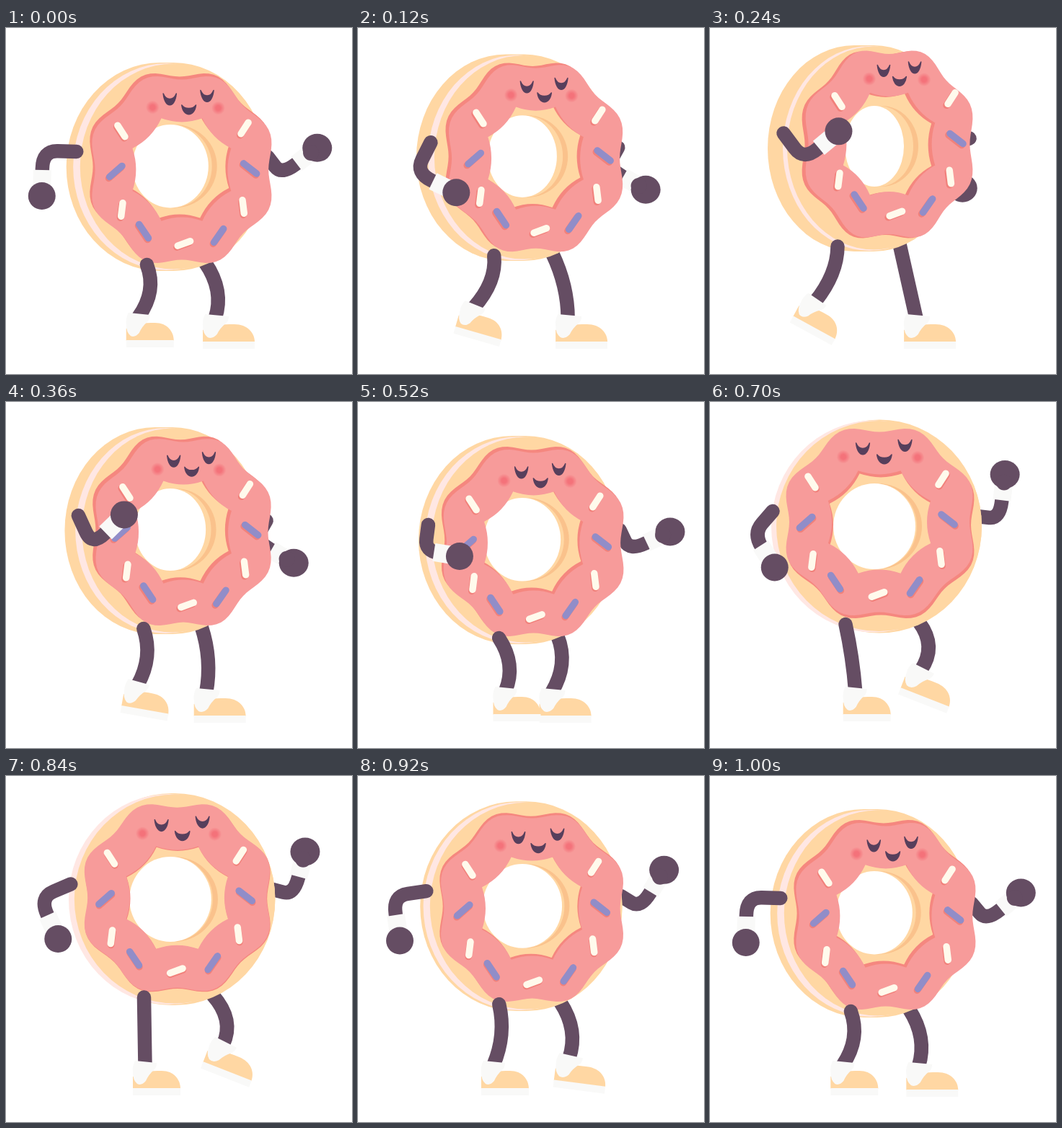
Recreate the animation shown at these times as an HTML page. Size 480 by 480 pixels, loop 1.02 s.

```html
<!DOCTYPE html>
<html lang="en">
<head>
<meta charset="utf-8">
<title>Walking donut</title>
<style>
  html, body { margin: 0; width: 100%; height: 100%; overflow: hidden; background: #fff; }
  svg { display: block; width: 100%; height: 100%; }
  .dough { fill: #ffd7a3; }
  .white { fill: #f9f9f8; }
  .limb { fill: none; stroke: #654d63; stroke-width: 19.5; stroke-linecap: round; stroke-linejoin: round; }
  .cuff { stroke: #f9f9f8; stroke-width: 25; }
  .hand { fill: #654d63; }
  .sprinkle { fill: none; stroke-width: 9.5; stroke-linecap: round; }
</style>
</head>
<body>
<svg viewBox="0 0 480 480">
  <defs>
    <radialGradient id="blush">
      <stop offset="0.35" stop-color="#f4727a"/>
      <stop offset="1" stop-color="#f4727a" stop-opacity="0"/>
    </radialGradient>
    <path id="icing" fill-rule="evenodd"/>
    <g id="shoe">
      <path class="dough" d="M0-9V-26Q14-34 34-34H40C57-34 66-22 66-9Z"/>
      <path class="white" d="M0-10H66V0H0Z"/>
      <path class="white" d="M3-48L33-45Q33-39 29-35Q22-29 18-20Q12-13 6-16Q0-21 0-32Q-1-40 3-48Z"/>
    </g>
  </defs>

  <path id="armR" class="limb"/>
  <path id="cuffR" class="cuff"/>
  <g id="handR" class="hand"><ellipse rx="20.5" ry="19.5"/><circle id="thumb" r="11"/></g>
  <path id="legR" class="limb"/>
  <use id="shoeR" href="#shoe"/>

  <rect id="back" class="dough"/>
  <ellipse id="cream" fill="#ffe7e3"/>
  <ellipse id="front" class="dough"/>
  <ellipse id="wall" fill="#fac28c"/>
  <ellipse id="inner" class="dough"/>
  <ellipse id="hole" fill="#fff"/>
  <use id="icingRim" href="#icing" fill="#f5877f"/>
  <use id="icingTop" href="#icing" fill="#f79b9a"/>
  <path id="shade" class="sprinkle" stroke="#f1817b"/>
  <path id="pale" class="sprinkle" stroke="#fffaec"/>
  <path id="blue" class="sprinkle" stroke="#918dc8"/>
  <circle id="cheekL" r="9.5" fill="url(#blush)"/>
  <circle id="cheekR" r="9.5" fill="url(#blush)"/>
  <path id="face" fill="#573f5c" stroke="#573f5c" stroke-width="1.5" stroke-linejoin="round"/>

  <path id="legL" class="limb"/>
  <use id="shoeL" href="#shoe"/>
  <path id="armL" class="limb"/>
  <path id="cuffL" class="cuff"/>
  <circle id="handL" class="hand" r="19"/>
</svg>
<script>
const LOOP = 1020, STEP = 20, RAD = Math.PI / 180;
const KEYS = [0, 240, 360, 520, 700, 840, 1000];

// Smooth cyclic curve through key values, flat wherever the direction turns.
function track(values, times = KEYS) {
  const n = values.length;
  const time = i => times[(i + n) % n] + Math.floor(i / n) * LOOP;
  const value = i => values[(i + n) % n];
  const slope = i => {
    const before = value(i) - value(i - 1), after = value(i + 1) - value(i);
    return before * after <= 0 ? 0 : (before + after) / (time(i + 1) - time(i - 1));
  };
  return t => {
    let i = n - 1;
    while (times[i] > t) i--;
    const span = time(i + 1) - time(i), u = (t - time(i)) / span, w = 1 - u;
    return value(i) * w * w * (1 + 2 * u) + value(i + 1) * u * u * (3 - 2 * u)
      + span * u * w * (slope(i) * w - slope(i + 1) * u);
  };
}

// The whole dance follows from the bounce, the turn and the swing of each arm.
const bounce = track([192.5, 167, 178.5, 191.5, 172.5, 163.5, 171, 190.5],
                     [0, 240, 360, 520, 700, 771, 840, 1000]);
const turn = track([0.51, 1, 0.7, 0.49, 0, 0.12, 0.51]);
const swingL = track([128, -2, -1, 45, 88, 103, 128]);
const swingR = track([-10, 98, 57, 2, -56, -48, -12]);

const wave = (t, peak) => Math.cos(2 * Math.PI * (t - peak) / LOOP);
const pulse = (t, peak) => Math.max(0, wave(t, peak)) ** 2;
const stride = (t, from, to) => t > from && t < to ? Math.sin(Math.PI * (t - from) / (to - from)) ** 2 : 0;

const el = id => document.getElementById(id);
const set = (id, attrs) => {
  for (const name in attrs) el(id).setAttribute(name, attrs[name]);
};
const mix = (a, b, k) => [a[0] + (b[0] - a[0]) * k, a[1] + (b[1] - a[1]) * k];
const distance = (a, b) => Math.hypot(b[0] - a[0], b[1] - a[1]);
const polar = ([x, y], r, degrees) => [x + r * Math.cos(degrees * RAD), y + r * Math.sin(degrees * RAD)];

// Quadratic arc from a to b that passes through m halfway.
const arcTo = (a, m, b) => `Q${mix(mix(a, b, 0.5), m, 2)} ${b}`;

const ellipse = (id, left, right, cy, ry) =>
  set(id, { cx: (left + right) / 2, rx: (right - left) / 2, cy, ry });

// Eight waves outside, eight shallow lobes inside, centred on the origin.
function icingPath() {
  let outer = '', inner = '';
  for (let a = 0; a < 360; a += 3)
    outer += (a ? 'L' : 'M') + polar([0, 0], 131 - 6 * Math.cos(8 * a * RAD), a);
  const corner = a => polar([0, 0], 77, a);
  for (let a = 22.5; a < 360; a += 45)
    inner += (inner ? '' : `M${corner(a)}`) + arcTo(corner(a), polar([0, 0], 66, a + 22.5), corner(a + 45));
  return outer + 'Z' + inner + 'Z';
}

// x, y, angle; every second one is blue and longer
const SPRINKLES = [
  [-95, -56, 57], [-103, 0, -41], [-94, 53, 97], [-62, 83, 56], [-3, 100, -20],
  [48, 89, -55], [84, 49, 83], [94, -4, 38], [86, -60, -57]
];

function drawBody({ y, s, wide, tilt }) {
  const left = 92 + 15 * wide, right = 377 - 30 * s, width = right - left, ry = 148 - 5 * wide;
  const back = 93 - 13 * wide, cream = 85 + 16 * s;
  set('back', { x: back, y: y - ry, width: right - back, height: 2 * ry, rx: width / 2, ry });
  ellipse('cream', cream, cream + width, y, ry - 1);
  ellipse('front', left, right, y - 0.5, ry - 2);

  const rx = 57 - 16 * s * s, holeY = y - 3 * s * s, holeRy = 59.5 - 3.5 * s, wall = 294 - 5 * s * s;
  ellipse('wall', 228 - rx, wall, holeY, holeRy);
  ellipse('inner', 228 - rx, Math.max(wall - 7, 228 + rx), holeY, holeRy);
  ellipse('hole', 228 - rx, 228 + rx, holeY, holeRy);

  const icingL = 106 + 27 * s, icingR = 364 + 4 * tilt;
  const scale = (icingR - icingL) / 258, cx = (icingL + icingR) / 2, cy = y - 6 + 10 * tilt;
  const rimX = 2 - 7 * wide, rimY = 4 - 3 * s - 6.5 * tilt;
  const place = (x, y) => ({ transform: `matrix(${scale} 0 0 1 ${x} ${y})` });
  set('icingTop', place(cx, cy));
  set('icingRim', place(cx + rimX, cy + rimY));
}

function drawSprinkles({ y, s, wide, tilt }) {
  const left = 141 + 37 * s, scale = (330 + 12 * wide - left) / 189;
  const centre = [left + 95 * scale, y - 5.5 + 13 * tilt - 4 * s * s];
  const d = ['', ''];
  SPRINKLES.forEach(([x, dy, angle], i) => {
    const at = [centre[0] + x * scale, centre[1] + dy], half = i % 2 ? 11.5 : 9.3;
    d[i % 2] += `M${polar(at, half, angle)}L${polar(at, -half, angle)}`;
  });
  set('pale', { d: d[0] });
  set('blue', { d: d[1] });
  set('shade', { d: d.join(''), transform: `translate(${1 - 3 * wide} 2)` });
}

const crescent = (x, y, w, outer, inner) =>
  `M${x - w} ${y}C${x - w + 2} ${y + outer} ${x + w - 2} ${y + outer} ${x + w} ${y}` +
  `C${x + w - 4} ${y + inner} ${x - w + 4} ${y + inner} ${x - w} ${y}Z`;

function drawFace({ y, s, wide, tilt }) {
  const left = 185 + 36 * s, width = 288 + 9 * wide - left, cheekY = y - 96.5 + 14 * tilt;
  const w = 6.5 + width * 0.028;
  set('cheekL', { cx: left, cy: cheekY });
  set('cheekR', { cx: left + width, cy: cheekY + 1 });
  set('face', {
    d: crescent(left + width * 0.262, cheekY - 19, w, 21, 10) +
       crescent(left + width * 0.83, cheekY - 23.5, w, 21, 10) +
       crescent(left + width * 0.552, cheekY - 3, w + 0.8, 17, 6)
  });
}

function drawArm(side, shoulder, angle, reach, upper, lower) {
  const hand = polar(shoulder, reach, angle);
  const bend = Math.acos((upper ** 2 + reach ** 2 - lower ** 2) / (2 * upper * reach)) / RAD;
  const elbow = polar(shoulder, upper, angle + bend);
  const toward = length => mix(hand, elbow, length / lower);
  set('arm' + side, { d: `M${shoulder}L${mix(shoulder, elbow, 0.55)}Q${elbow} ${mix(elbow, hand, 0.4)}L${toward(20)}` });
  set('cuff' + side, { d: `M${toward(14)}L${toward(36)}` });
  set('hand' + side, { transform: `translate(${hand})` });
  return angle + bend;
}

function drawArms({ t, y, wide }) {
  const fold = 1 - 0.25 * pulse(t, 570);
  drawArm('L', [87 + 15 * wide, y - 21], swingL(t), 78 - 20 * pulse(t, 450), 47 * fold, 63 * fold);
  const upperAngle = drawArm('R', [370 - 10 * wide, y - 14], swingR(t), 70, 32, 62);
  const [cx, cy] = polar([0, 0], 11, upperAngle + 90);
  set('thumb', { cx, cy });
}

function drawLeg(side, hip, heel, tilt, size, length) {
  const ankle = polar(polar(heel, 17, tilt), 42, tilt - 90);
  const knee = mix(hip, ankle, 0.5);
  knee[0] += 0.17 * Math.sqrt(Math.max(0, length ** 2 - distance(hip, ankle) ** 2));
  set('leg' + side, { d: `M${hip}` + arcTo(hip, knee, ankle) });
  set('shoe' + side, { transform: `translate(${heel}) rotate(${tilt}) scale(${size} 1)` });
}

function drawLegs({ t, y, s, tilt }) {
  const stepL = stride(t, 0, 450), stepR = stride(t, 540, 1000);
  const heelL = [177 + 11 * wave(t, 570) - 62 * stepL, 443 - 35 * stepL];
  const heelR = [262.5 + 12 * wave(t, 80) + 10 * stepR, 445 - 50 * stepR];
  drawLeg('L', [188 - 11 * s + 13 * tilt, y + 136], heelL, 29 * stepL, 1, 94);
  drawLeg('R', [290 - 27 * s, y + 133], heelR, 27 * stepR, 1.09, 98);
}

function draw(t) {
  const s = turn(t);
  const pose = { t, s, y: bounce(t), wide: Math.sin(s * Math.PI / 2), tilt: Math.sin(s * Math.PI) };
  drawBody(pose);
  drawSprinkles(pose);
  drawFace(pose);
  drawArms(pose);
  drawLegs(pose);
}

set('icing', { d: icingPath() });
const start = performance.now();
function tick() {
  const t = (performance.now() - start) % LOOP;
  draw(Math.floor(t / STEP) * STEP);
  requestAnimationFrame(tick);
}
tick();
</script>
</body>
</html>
```
